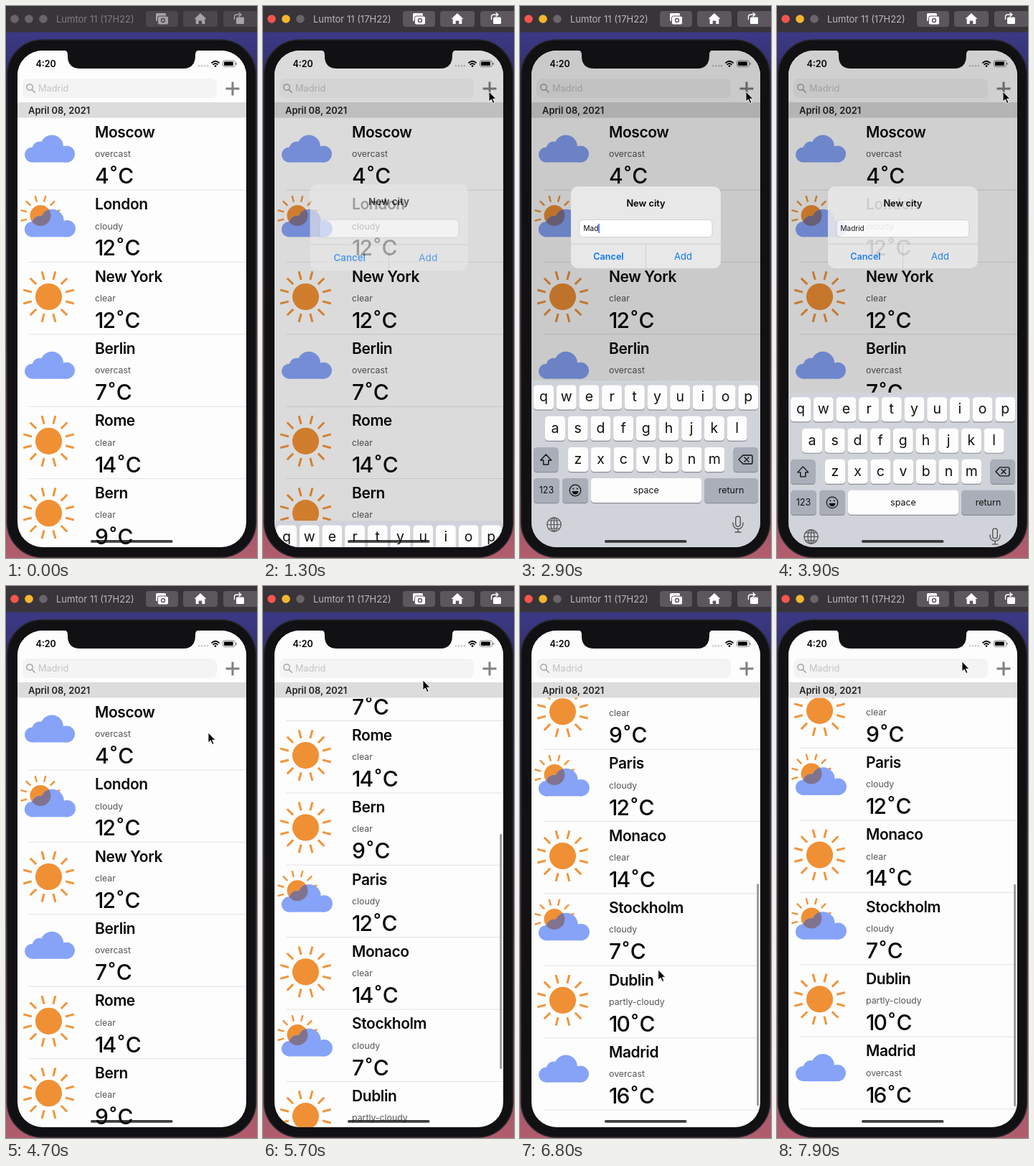
Write an HTML page that moves like this. It is 350 px wide and 768 px high and loops after 8000 ms.

```html
<!DOCTYPE html>
<html lang="en">
<head>
<meta charset="utf-8">
<title>Weather list</title>
<style>
html, body { margin: 0; height: 100%; overflow: hidden; background: #111; }
svg { display: block; width: 100vw; height: 100vh; font-family: Inter, Roboto, sans-serif; }
.mid { text-anchor: middle; }
.semi { font-weight: 600; }
.line { fill: none; stroke-linecap: round; stroke-linejoin: round; }
</style>
</head>
<body>
<svg id="stage" viewBox="0 0 350 768"></svg>
<script>
const LOOP = 8000, ROW = 100.4, TOP = 155.5, END = 532.4;
const cities = [
  ['Moscow', 'overcast', 4], ['London', 'cloudy', 12], ['New York', 'clear', 12],
  ['Berlin', 'overcast', 7], ['Rome', 'clear', 14], ['Bern', 'clear', 9],
  ['Paris', 'cloudy', 12], ['Monaco', 'clear', 14], ['Stockholm', 'cloudy', 7],
  ['Dublin', 'partly-cloudy', 10], ['Madrid', 'overcast', 16]
];

const rect = (x, y, w, h, r, fill, more = '') =>
  `<rect x="${x}" y="${y}" width="${w}" height="${h}" rx="${r}" fill="${fill}" ${more}/>`;
const disc = (x, y, r, fill, more = '') =>
  `<circle cx="${x}" cy="${y}" r="${r}" fill="${fill}" ${more}/>`;
const text = (x, y, size, str, fill = '#000', more = '') =>
  `<text x="${x}" y="${y}" font-size="${size}" fill="${fill}" ${more}>${str}</text>`;
const line = (d, color, width, more = '') =>
  `<path class="line" d="${d}" stroke="${color}" stroke-width="${width}" ${more}/>`;

// Weather icons
function sun(x, y, r, inner, outer, width) {
  let d = '';
  for (let i = 0; i < 12; i++) {
    const a = (15 + i * 30) * Math.PI / 180, c = Math.cos(a), s = Math.sin(a);
    d += `M${x + inner * c} ${y + inner * s}L${x + outer * c} ${y + outer * s}`;
  }
  return `<path d="${d}" stroke="#f2943a" stroke-width="${width}"/>` + disc(x, y, r, '#f09035');
}
const cloudShape = disc(36.5, 51.5, 10.5) + disc(47, 43.5, 10.5) + disc(64, 40, 16) +
  disc(84.5, 50.5, 11.5) + rect(36, 43.5, 49, 18.5, 0);
const cloud = '<use href="#cloud" fill="#86a3f7"/>';
const lowered = 'translate(-.5 2.5) scale(1.015)';
const icons = {
  overcast: cloud,
  clear: sun(59.5, 48.2, 18.6, 24.5, 36.5, 3),
  cloudy: sun(48, 35.6, 14.5, 19.5, 28.5, 2.4) +
    `<g transform="${lowered}">${cloud}</g>` +
    disc(48, 35.6, 14.5, '#80738f', 'clip-path="url(#cloudClip)"')
};
icons['partly-cloudy'] = icons.clear;

const row = ([name, sky, temp], i) => `<g class="row" transform="translate(0 ${TOP + i * ROW})">` +
  icons[sky] +
  text(124, 27.3, 21, name, '#0a0a0a', 'class="semi" letter-spacing="-.42"') +
  text(124, 54.7, 12.3, sky, '#555') +
  text(124, 91.5, 30, `<tspan letter-spacing="-2">${temp}</tspan><tspan dx="3.5">˚</tspan><tspan dx="1.5">C</tspan>`,
    '#0a0a0a', 'font-weight="500"') +
  rect(32, 100, 303, 1, 0, '#e2e2e2') + '</g>';

// Keyboard
const keyShade = '#a9aeb8';
const key = (x, y, w, label = '', size = 19.5, fill = '#fdfdfd') =>
  rect(x, y + 1.2, w, 34, 4.5, '#8b8e94') + rect(x, y, w, 34, 4.5, fill) +
  text(x + w / 2, y + 17 + size * .3, size, label, '#111', 'class="mid"');
const letters = (str, x, y) =>
  [...str].map((c, i) => key(x + i * 31.7, y, 28, c)).join('');
const keyboard = rect(16, 521, 319, 260, 0, '#d0d3d9') +
  letters('qwertyuiop', 19, 527.5) + letters('asdfghjkl', 35, 570.8) + letters('zxcvbnm', 67, 614) +
  key(19, 614, 34.5, '', 0, keyShade) + key(297.5, 614, 34.5, '', 0, keyShade) +
  key(19, 657, 36, '123', 12.5, keyShade) + key(59, 657, 36, '', 0, keyShade) +
  key(99, 657, 154, 'space', 12.5) + key(257, 657, 75, 'return', 12.5, keyShade) +
  line('M36.2 624l-7.5 8h4v6h7v-6h4z', '#111', 1.4) +
  line('M311 625h11a2 2 0 0 1 2 2v8a2 2 0 0 1-2 2h-11l-6-6zM313 628l6 6m0-6l-6 6', '#111', 1.4) +
  disc(77, 674, 7.8, 'none', 'stroke="#111" stroke-width="1.2"') +
  disc(74.3, 671.5, 1, '#111') + disc(79.7, 671.5, 1, '#111') +
  '<path d="M72.500 675h9a4.500 4.500 0 0 1-9 0z" fill="#111"/>' +
  disc(47.5, 721.5, 9.7, 'none', 'stroke="#555" stroke-width="1.3"') +
  '<ellipse cx="47.5" cy="721.5" rx="4.5" ry="9.7" fill="none" stroke="#555" stroke-width="1.2"/>' +
  line('M47.5 712v19M38 721.5h19M40 716h15M40 727h15', '#555', 1.2) +
  rect(300.7, 710, 6.6, 14, 3.3, 'none', 'stroke="#555" stroke-width="1.4"') +
  line('M297 719v1.5a7 7 0 0 0 14 0V719M304 728v4M300 732h8', '#555', 1.4);

const alertBox = rect(71, 251, 209, 114, 10, '#e8e8e9') +
  text(175.5, 279, 12.8, 'New city', '#000', 'class="semi mid"') +
  rect(83, 297.5, 185, 24, 5, '#fff', 'stroke="#c9c9cb" stroke-width=".8"') +
  text(88.5, 313, 10, '', '#000', 'id="typed"') +
  rect(88.5, 303, 1.5, 13, 0, '#3567e8', 'id="caret"') +
  '<path d="M71 331H280M175.5 331V365" stroke="#c6c6c8" stroke-width=".8"/>' +
  text(123.5, 353, 12.6, 'Cancel', '#0a78f0', 'class="semi mid"') +
  text(227.5, 353, 13, 'Add', '#0a78f0', 'class="mid"');

const topBar = rect(16, 62, 319, 93.5, 0, '#fdfdfd') +
  text(41.5, 85, 12.5, '4:20', '#000', 'class="semi"') +
  [269, 273, 277, 281].map(x => disc(x, 83.3, 1.2, '#c4c4c4')).join('') +
  line('M287 79q5-4.5 10 0M289 81.3q3-2.6 6 0', '#000', 1.7) + disc(292, 83.6, 1.4, '#000') +
  rect(302.5, 76, 17, 8.5, 2.4, '#fff', 'stroke="#777" stroke-width=".9"') +
  rect(304, 77.5, 13, 5.5, 1.2, '#000') + rect(320.5, 78.8, 1.3, 3, .6, '#777') +
  rect(23, 101, 271, 27, 7, '#f4f4f4') +
  disc(33, 113, 4.2, 'none', 'stroke="#999" stroke-width="1.3"') + line('M36.2 116.2l4 4', '#999', 1.3) +
  text(45, 118.7, 12.8, 'Madrid', '#c3c3c5') +
  '<path d="M316 105.500v19M306.500 115h19" stroke="#808080" stroke-width="3"/>' +
  rect(16, 134, 319, 21.5, 0, '#dcdcdc') +
  text(31, 150, 12.9, 'April 08, 2021', '#222', 'class="semi"');

const chrome = rect(0, 0, 350, 36.5, 0, '#38343a') +
  [12, 32, 52].map(x => disc(x, 18, 5.8, '#69656b', 'class="light"')).join('') +
  `<g id="tools">${text(70, 22.6, 13, 'Lumtor 11 (17H22)', '#bab7bb')}` +
  rect(195, 7, 45, 22, 4, '#5b575d') + rect(247, 7, 48, 22, 4, '#5b575d') + rect(303, 7, 52, 22, 4, '#5b575d') +
  rect(209, 10, 14, 11, 1.5, '#fff') + rect(211.5, 14, 15, 12, 2.5, '#fff', 'stroke="#5b575d"') +
  disc(219, 20, 3.2, '#5b575d') + disc(219, 20, 1.7, '#fff') +
  '<path d="M271 10l8.500 8h-2.200v7h-4v-4.500h-4.600v4.500h-4v-7h-2.200z" fill="#fff"/>' +
  rect(321, 15.5, 11, 9.5, 1.5, '#fff') + line('M318.500 18.500v-3.500q0-3 3-3h6M325 9.500l3 2.500-3 2.500', '#fff', 1.4) + '</g>';

document.getElementById('stage').innerHTML = `<defs>
  <linearGradient id="wall" x2="0" y2="1"><stop offset=".05" stop-color="#3b3985"/><stop offset=".2" stop-color="#2d2854"/>
    <stop offset=".6" stop-color="#5c3450"/><stop offset="1" stop-color="#b25d6e"/></linearGradient>
  <g id="cloud">${cloudShape}</g>
  <clipPath id="cloudClip" transform="${lowered}">${cloudShape}</clipPath>
  <clipPath id="screen"><rect x="16" y="62" width="319" height="691" rx="35"/></clipPath>
  <clipPath id="list"><rect x="16" y="155" width="319" height="600"/></clipPath></defs>
  <rect width="350" height="768" fill="url(#wall)"/>
  ${rect(1.5, 47, 347, 720, 49, '#111113', 'stroke="#29282d" stroke-width="1.5"')}
  <g clip-path="url(#screen)">
    ${rect(16, 62, 319, 691, 0, '#fdfdfd')}
    <g clip-path="url(#list)"><g id="rows">${cities.map(row).join('')}</g>
      ${rect(330.3, 0, 2.6, 300, 1.3, '#909090', 'id="bar"')}</g>
    ${topBar}
    ${rect(16, 62, 319, 691, 0, '#000', 'id="dim"')}
    <g id="alert">${alertBox}</g><g id="keys">${keyboard}</g>
    ${rect(118, 743, 114.5, 3.8, 1.9, '#111', 'opacity=".8"')}
  </g>
  <path d="M80 61.500q6 0 6 6v2q0 17.500 17.500 17.500h143q17.500 0 17.500-17.500v-2q0-6 6-6z" fill="#111113"/>
  ${chrome}
  <path id="cursor" d="M0 0V14L3.300 11 5.700 16.500 8 15.500 5.600 10.300H10Z" fill="#000" stroke="#fff" stroke-width=".9"/>`;

const $ = id => document.getElementById(id);
const set = (el, name, value) => el.setAttribute(name, value);
const lightColors = ['#f5554d', '#f3b62f', '#69656b'];
const lights = document.querySelectorAll('.light');
const newRow = $('rows').lastElementChild;

const smooth = (t, a, b) => {
  const p = Math.min(1, Math.max(0, (t - a) / (b - a)));
  return p * p * (3 - 2 * p);
};
const pulse = (t, a, b, c, d) => smooth(t, a, b) - smooth(t, c, d);

// Pointer stops: time, x, y
const stops = [[300, 335, 330], [900, 315, 119], [4300, 315, 119], [4700, 282, 204], [5150, 222, 500],
  [5700, 223, 131], [6150, 192, 540], [6750, 192, 540], [7300, 225, 290], [7800, 258, 105]];
function pointer(t) {
  let i = stops.findIndex(s => s[0] > t);
  if (i < 0) return stops[stops.length - 1].slice(1);
  i = Math.max(1, i);
  const [a, b] = [stops[i - 1], stops[i]], p = smooth(t, a[0], b[0]);
  return [a[1] + (b[1] - a[1]) * p, a[2] + (b[2] - a[2]) * p];
}

// Drag, then glide to the end, then a short pull past it
function scrollAt(t) {
  if (t < 5700) return 369 * smooth(t, 5150, 5700);
  return 369 + (END - 369) * (1 - Math.exp((5700 - t) / 235)) + 40 * pulse(t, 6800, 7250, 7400, 7850);
}

function draw(t) {
  const active = t >= 800;
  lights.forEach((l, i) => set(l, 'fill', active ? lightColors[i] : '#69656b'));
  set($('tools'), 'opacity', active ? 1 : .55);

  const y = scrollAt(t), content = Math.min(1104.4, 1043 + (y - 369) * .43);
  const h = 309 * 1104.4 / content, inside = Math.min(y, END);
  set($('rows'), 'transform', `translate(0 ${-y})`);
  set(newRow, 'opacity', smooth(t, 5850, 6500));
  set($('bar'), 'y', 156 + inside * (568 - h) / (content - 572));
  set($('bar'), 'height', h - (y - inside));
  set($('bar'), 'opacity', smooth(t, 5150, 5300));

  const shown = pulse(t, 1150, 1400, 3840, 4120);
  set($('alert'), 'opacity', shown);
  set($('dim'), 'opacity', .205 * shown);
  const grow = 1 + .15 * (1 - smooth(t, 1150, 1400));
  set($('alert'), 'transform', `translate(175.5 308) scale(${grow}) translate(-175.5 -308)`);
  set($('keys'), 'transform', `translate(0 ${232 * (1 - pulse(t, 1200, 1600, 3835, 4235))})`);

  const count = Math.max(0, Math.min(6, Math.floor((t - 2000) / 230)));
  $('typed').textContent = 'Madrid'.slice(0, count);
  set($('caret'), 'x', 88.5 + $('typed').getComputedTextLength());
  set($('caret'), 'opacity', t < 3800 && (t > 2200 && t < 3400 || t % 1000 > 400) ? 1 : 0);

  const [x, py] = pointer(t);
  set($('cursor'), 'transform', `translate(${x} ${py})`);
  set($('cursor'), 'opacity', t < 400 ? 0 : 1);
}

function tick() {
  draw(performance.now() % LOOP);
  requestAnimationFrame(tick);
}
tick();
</script>
</body>
</html>
```
